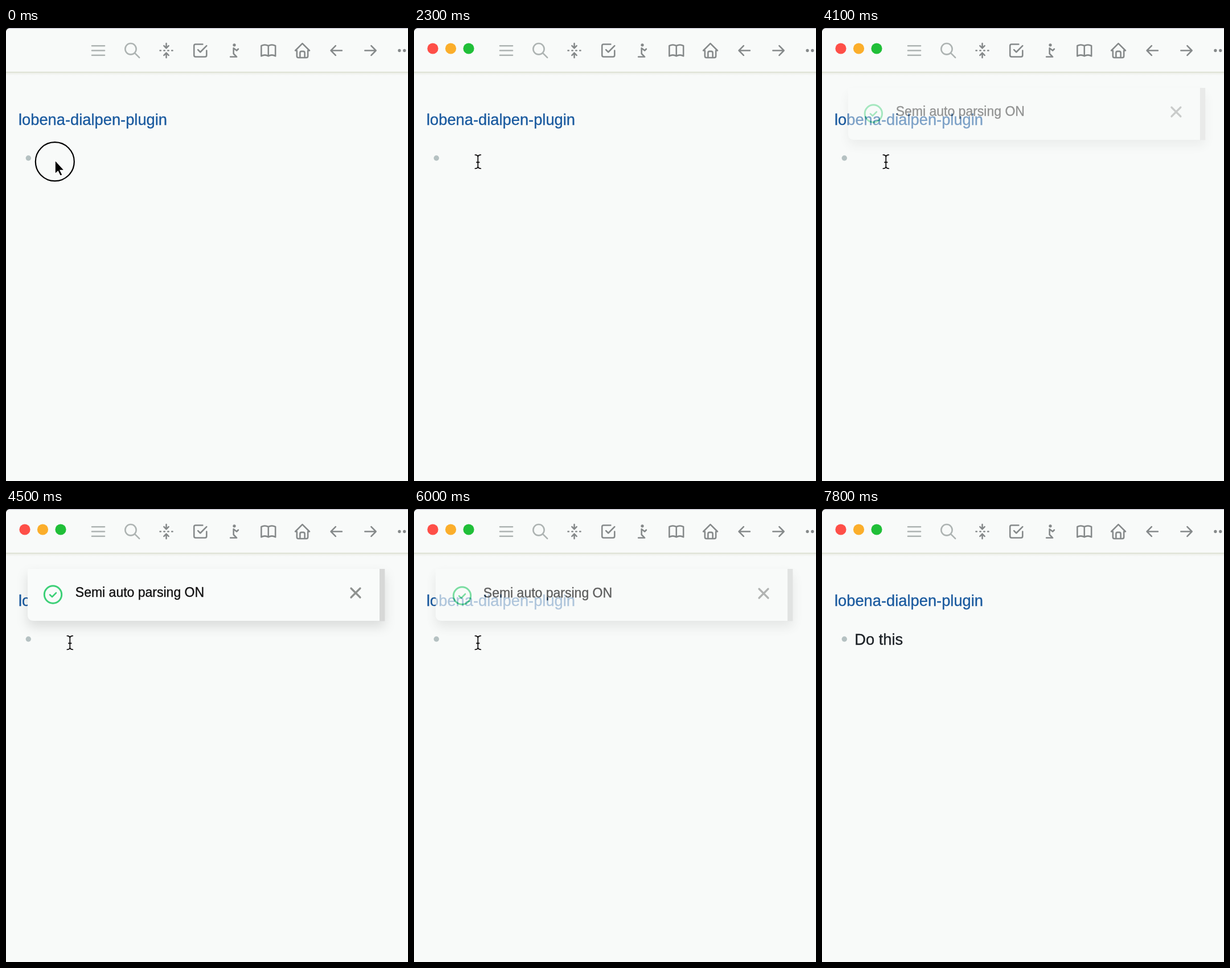
Write an HTML page that moves like this. It is 706x794 px and loops after 8000 ms.

```html
<!DOCTYPE html>
<html lang="en">
<head>
<meta charset="utf-8">
<title>Note editor</title>
<style>
  html, body { margin: 0; width: 100%; height: 100%; overflow: hidden; background: #f8faf9; }
  svg { display: block; width: 100%; height: 100%; }
  text { font: 27.3px "Liberation Sans", Arial, sans-serif; white-space: pre; stroke-width: .35px; }
  .line { fill: none; stroke-linecap: round; stroke-linejoin: round; }
  #toast-card { filter: drop-shadow(0 10px 10px rgba(0, 0, 0, .12)); }
</style>
</head>
<body>
<svg viewBox="0 0 706 794">
  <defs>
    <linearGradient id="fade" x2="0" y2="1">
      <stop stop-color="#dcdfd2" stop-opacity=".5"/>
      <stop offset="1" stop-color="#dcdfd2" stop-opacity="0"/>
    </linearGradient>
    <path id="beam-shape" d="M-5 -12Q0 -12 0 -8Q0 -12 5 -12M0 -8V8M-5 12Q0 12 0 8Q0 12 5 12M-2.5 1H2.5"/>
  </defs>
  <rect width="706" height="794" fill="#f8faf9"/>
  <rect y="78" width="706" height="5" fill="url(#fade)"/>
  <rect y="76.7" width="706" height="1.5" fill="#d9ddce"/>
  <rect width="706" height="1.2" fill="#bfbccb"/>
  <path d="M0 0H6Q1 1 0 6Z"/>

  <g id="lights">
    <circle cx="33" cy="36" r="9.6" fill="#fe4f48"/>
    <circle cx="64.5" cy="36" r="9.6" fill="#fbae2b"/>
    <circle cx="96" cy="36" r="9.6" fill="#20bf38"/>
  </g>
  <g id="toolbar" class="line" stroke-width="1.85"></g>

  <text x="22" y="170" fill="#1a5a9f" stroke="#1a5a9f">lobena-dialpen-plugin</text>
  <circle cx="39.3" cy="228" r="4.7" fill="#b5c1c2"/>
  <text id="typed" x="57.2" y="237.6" fill="#1c2126" stroke="#1c2126"></text>
  <rect id="caret" width="1.9" height="31.5"/>

  <g id="toast">
    <path id="toast-card" d="M38 105H665V196H49Q38 196 38 185Z" fill="#f9fbfa"/>
    <rect x="656" y="105" width="9.3" height="91.5" fill="#d7d8d7"/>
    <g id="badge" class="line" stroke="#3dd077">
      <circle cx="82.5" cy="150" r="15.2" stroke-width="3"/>
      <path d="M77 150.3L81 154L88 147" stroke-width="2.6"/>
    </g>
    <g id="message">
      <text x="121.8" y="154.2" fill="#111" stroke="#111" style="font-size:23px">Semi auto parsing ON</text>
      <path class="line" d="M606 139L622 155M622 139L606 155" stroke="#8e918f" stroke-width="3.2"/>
    </g>
  </g>

  <circle id="ring" fill="none" stroke="#000" stroke-width="2.2"/>
  <path id="arrow" d="M86 231.5V256L91.2 251.2L95.2 259.4L99.2 257.5L95.3 249.6H102.8Z" stroke="#fff" stroke-width="1.6"/>
  <g id="beam" class="line">
    <use href="#beam-shape" stroke="#fff" stroke-width="3.6"/>
    <use href="#beam-shape" stroke="#000" stroke-width="1.7"/>
  </g>
</svg>
<script>
const LOOP = 8000, STEP = 100;
const $ = id => document.getElementById(id);
const set = (id, attrs) => {
  for (const name in attrs) $(id).setAttribute(name, attrs[name]);
};
const ramp = (t, from, to) => Math.min(1, Math.max(0, (t - from) / (to - from)));
const easeOut = p => 1 - (1 - p) ** 2;
const within = (t, from, to) => t >= from && t < to;

// Toolbar icons on a 24-unit grid, evenly spaced.
const dot = (x, y) => `M${x - 1} ${y}a1 1 0 1 0 2 0a1 1 0 1 0 -2 0`;
const icons = [
  'M4 6H20M4 12H20M4 18H20',
  'M3 10a7 7 0 1 0 14 0a7 7 0 1 0 -14 0M21 21l-6 -6',
  'M12 3v6l3 -3M9 6l3 3M12 21v-6l3 3M9 18l3 -3M4 12h1M9 12h1M14 12h1M19 12h1',
  'M9 11l3 3l8 -8M20 12v6a2 2 0 0 1 -2 2H6a2 2 0 0 1 -2 -2V6a2 2 0 0 1 2 -2h9',
  dot(12, 5) + 'M7 20h8l-4 -4v-7l4 3l2 -2',
  'M3 19a9 9 0 0 1 9 0a9 9 0 0 1 9 0M3 6a9 9 0 0 1 9 0a9 9 0 0 1 9 0M3 6v13M12 6v13M21 6v13',
  'M5 12H3l9 -9l9 9h-2M5 12v7a2 2 0 0 0 2 2h10a2 2 0 0 0 2 -2v-7M9 21v-6a2 2 0 0 1 2 -2h2a2 2 0 0 1 2 2v6',
  'M5 12h14M5 12l6 6M5 12l6 -6',
  'M5 12h14M13 18l6 -6M13 6l6 6',
  dot(5.6, 12) + dot(12, 12)
];
$('toolbar').innerHTML = icons.map((d, i) =>
  `<path d="${d}" stroke="${i < 2 ? '#adb3b2' : '#85898a'}"
    transform="translate(${162 + 59.75 * i} 39.5) scale(1.38) translate(-12 -12)"/>`).join('');

const phrase = 'Do this';
const keyTimes = [6200, 6300, 6400, 6700, 6800, 7000, 7200];

function drawPointer(t) {
  const firstClick = ramp(t, 0, 400), secondClick = ramp(t, 5100, 5400);
  const second = t >= 5100;
  set('ring', {
    cx: second ? 112 : 85.8,
    cy: 234.2,
    r: second ? 28 - 6 * secondClick : 34 - 10 * firstClick,
    opacity: second ? 1 - secondClick : 1 - firstClick
  });
  const x = 86 + 26 * easeOut(ramp(t, 1000, 1500));
  set('arrow', { opacity: t < 300 ? 1 : 0 });
  set('beam', { opacity: within(t, 300, 6200) ? 1 : 0, transform: `translate(${x + .3} 234.3)` });
  set('lights', { opacity: ramp(t, 0, 300) });
}

function drawToast(t) {
  const enter = easeOut(ramp(t, 4000, 4400)), leave = ramp(t, 5900, 6200);
  const nudge = t >= 5100 ? 1 : 0;
  set('toast', { opacity: enter * (1 - leave), transform: `translate(${14 * (1 - enter)} 0)` });
  set('badge', { transform: `translate(${2 * nudge} ${2 * nudge})` });
  set('message', { transform: `translate(0 ${nudge})` });
}

function drawTyping(t) {
  const count = keyTimes.filter(time => time <= t).length;
  $('typed').textContent = phrase.slice(0, count);
  const width = count ? $('typed').getComputedTextLength() : 0.8;
  const visible = within(t, 5200, 5700) || within(t, 6200, 7800);
  set('caret', { x: 57.2 + width, y: count ? 212 : 213.7, opacity: visible ? 1 : 0 });
}

function frame(now) {
  const t = Math.floor(now % LOOP / STEP) * STEP;
  drawPointer(t);
  drawToast(t);
  drawTyping(t);
  requestAnimationFrame(frame);
}
frame(0);
</script>
</body>
</html>
```
